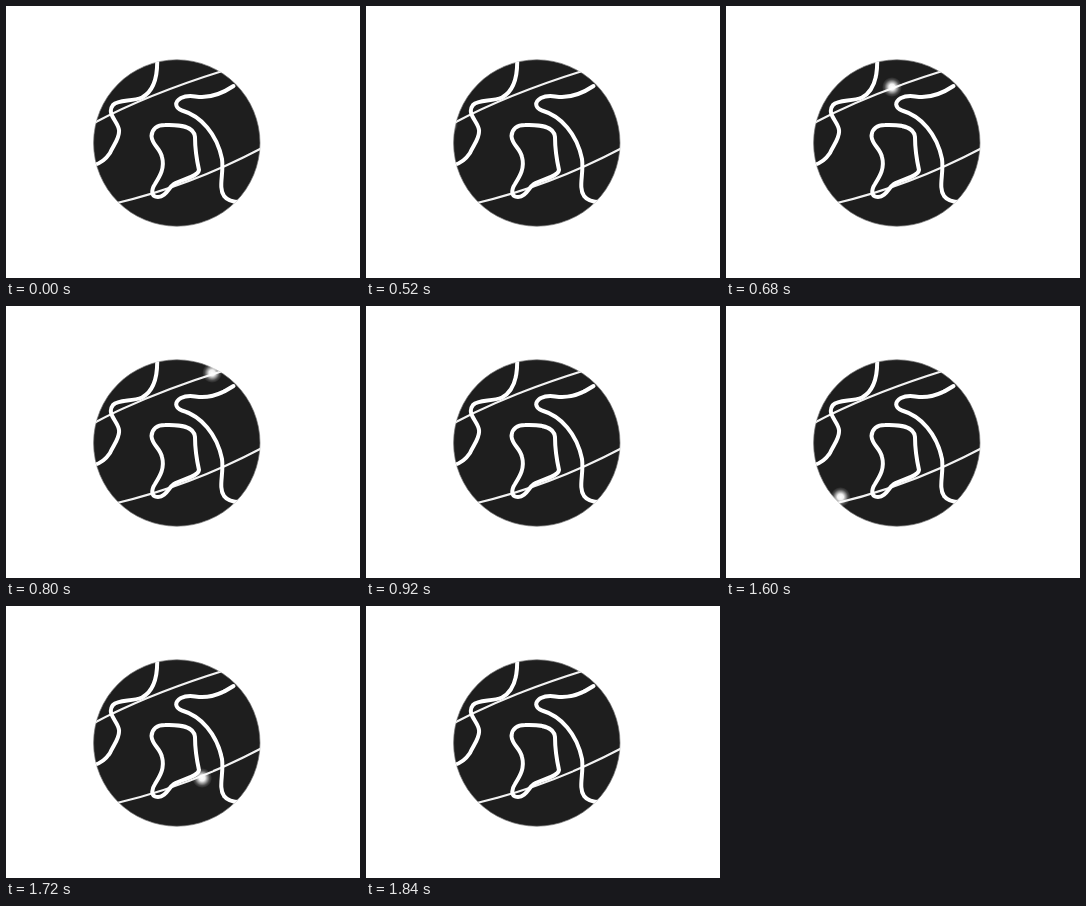
An HTML page for the animation above (2000 ms loop, 354x272 px).

```html
<!DOCTYPE html>
<html lang="en">
<head>
<meta charset="utf-8">
<title>Contour disc</title>
<style>
  html, body { margin: 0; width: 100%; height: 100%; overflow: hidden; background: #fff; }
  svg { display: block; width: 100%; height: 100%; }
</style>
</head>
<body>
<svg viewBox="0 0 354 272">
  <defs>
    <radialGradient id="halo">
      <stop offset="0" stop-color="#fff"/>
      <stop offset=".3" stop-color="#fff" stop-opacity=".94"/>
      <stop offset=".5" stop-color="#fff" stop-opacity=".6"/>
      <stop offset=".75" stop-color="#fff" stop-opacity=".2"/>
      <stop offset="1" stop-color="#fff" stop-opacity="0"/>
    </radialGradient>
    <clipPath id="disc"><circle cx="170.8" cy="137" r="83.5"/></clipPath>
  </defs>
  <circle cx="170.8" cy="137" r="83.2" fill="#1e1e1e" stroke="#777" stroke-width=".7"/>
  <g clip-path="url(#disc)" fill="none" stroke="#fff" stroke-linecap="round" stroke-linejoin="round">
    <g stroke="#f2f2f2" stroke-width="2.2">
      <path d="M88 117Q141 88.5 218 64.5"/>
      <path d="M109 197.5Q184 180 256 142"/>
    </g>
    <g stroke-width="4">
      <path d="M151 50C152 67 150 84 136 91.5C125 96 113 93 107 99C100 108 112 115 113 124C114 132 108 138 104 147C100 153 96 157 88 159"/>
      <path d="M227.500 80C217 87 207 91 196 91C188 91 183 88 175 92C168 96 169 102 176 104.500C195 110 211 128 216 153C218 168 212 181 218 190C221 194 226 196 234 196"/>
      <path d="M159 119C174 118.500 188 120 189 131C189 144 191 155 193 164C192 171 176 173 168 178C162 182 160 191 152 191C145 191 145 184 149 178C154 170 159 162 156 151C154 142 146 139 145.500 130C146 123 151 119 159 119Z"/>
    </g>
  </g>
  <circle id="glow" r="10" fill="url(#halo)"/>
</svg>
<script>
const glow = document.getElementById("glow");
const LOOP = 2000, STEP = 40;

// Each pass: start and end time, then x and y as [start, speed, acceleration] per step.
const passes = [
  { from: 520, to: 920, x: [82, 25.36, -1.09], y: [119, -12.2, 0.68] },
  { from: 1600, to: 1840, x: [114.5, 27.2, 0], y: [191, -1.43, -1.63] }
];

const along = ([p, v, a], u) => p + v * u + a * u * u;

function draw(ms) {
  const t = Math.floor((ms % LOOP) / STEP) * STEP;
  const pass = passes.find(p => t >= p.from && t < p.to);
  glow.setAttribute("visibility", pass ? "visible" : "hidden");
  if (!pass) return;
  const u = (t - pass.from) / STEP;
  glow.setAttribute("cx", along(pass.x, u));
  glow.setAttribute("cy", along(pass.y, u));
}

let start;
function tick(now) {
  start ??= now;
  draw(now - start);
  requestAnimationFrame(tick);
}
draw(0);
requestAnimationFrame(tick);
</script>
</body>
</html>
```
